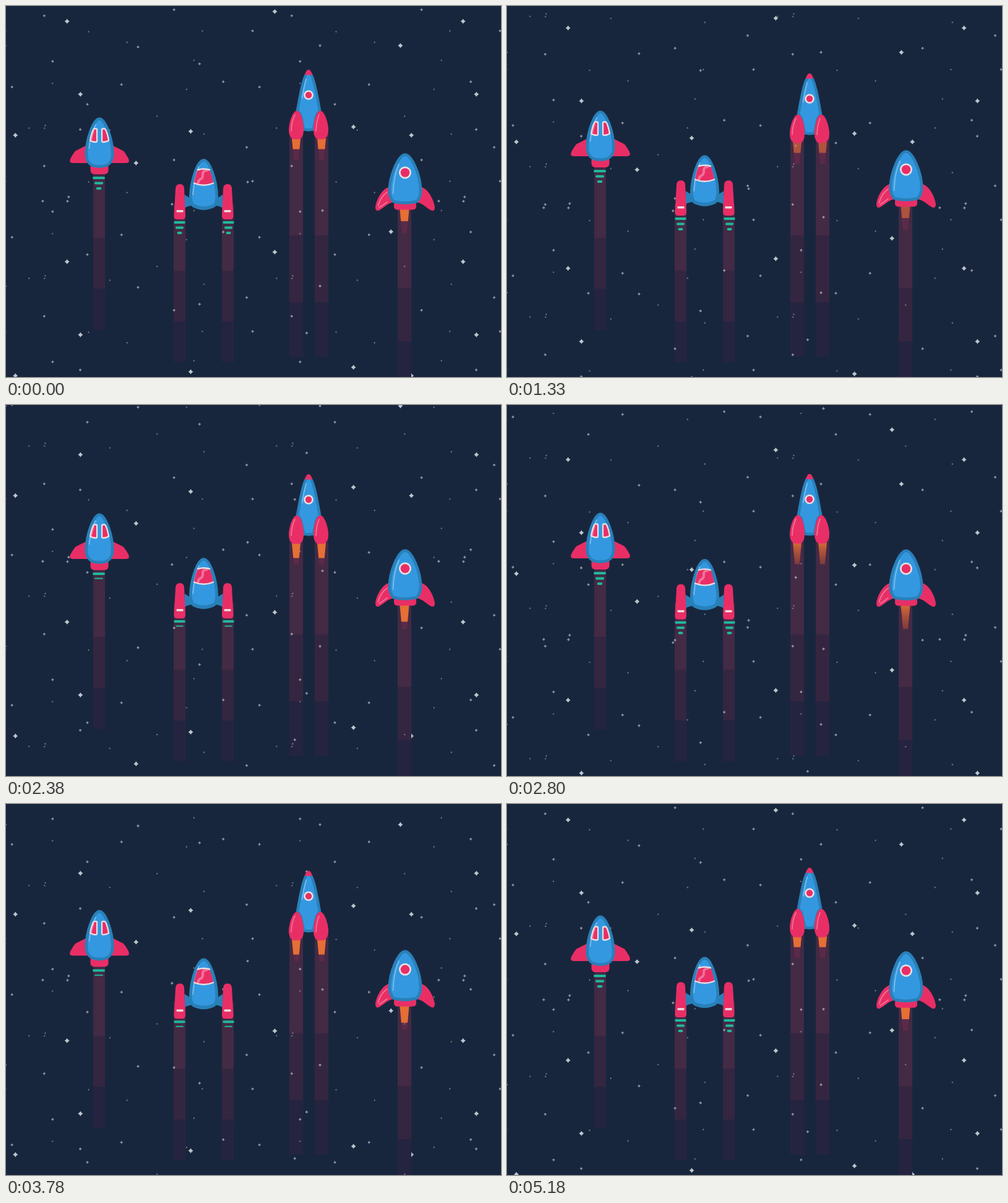
Write an HTML page with a canvas that moves like this. It is 800 px wide and 600 px high and loops after 5.25 s.

```html
<!DOCTYPE html>
<html lang="en">
<head>
<meta charset="utf-8">
<title>Rockets</title>
<style>
  html, body { margin: 0; width: 100%; height: 100%; overflow: hidden; background: #18263d; }
  canvas { display: block; }
</style>
</head>
<body>
<canvas id="stage" width="800" height="600"></canvas>
<script>
const ctx = document.getElementById('stage').getContext('2d');
const STEP = 70, STEPS = 75;
const NIGHT = '#18263d', BLUE = '#3498e0', DARK = '#2980b9', PINK = '#e92e66',
      PALE = '#e6dfe2', GREEN = '#1fb89c', ORANGE = '#e56f35', SHINE = 'rgba(255,255,255,.33)';
const TRAIL = ['#432a45', '#342641', '#252440'];

// Star tile, 400 x 243; the first nine are the large ones.
const TILE_W = 400, TILE_H = 243;
const STARS = [
  [61.5, 15.1], [75, 88.9], [9.3, 130.3], [131.2, 158.4], [186.4, 126.3], [271.3, 5.3],
  [350.8, 121.8], [388.7, 227.8], [398.2, 39.7],
  [133.2, 41], [195.3, 58.1], [74.8, 124.5], [63.1, 192.6], [61.9, 197], [36.9, 196.8], [243.9, 177.6],
  [167.5, 200], [319.5, 206.4], [317, 39.7], [303.5, 87.2], [291.5, 134.2]
];

// Heights of the four noses at a few steps; the drift between them is smooth.
const KEYS = [0, 10, 19, 34, 47, 61, 74];
const DRIFT = [
  [180, 174, 169, 175, 172, 172, 180],
  [247, 242, 241, 247, 250, 248, 247],
  [103, 106, 109, 112, 110, 106, 103],
  [238, 236, 233, 233, 234, 238, 238]
];

function drift(ys, k) {
  const n = KEYS.length - 1;
  const at = i => {
    const lap = Math.floor(i / n), j = i - lap * n;
    return [KEYS[j] + lap * KEYS[n], ys[j]];
  };
  const slope = i => {
    const [x0, y0] = at(i - 1), [x1, y1] = at(i + 1);
    return (y1 - y0) / (x1 - x0);
  };
  let i = 0;
  while (i < n - 1 && k >= KEYS[i + 1]) i++;
  const [x0, y0] = at(i), [x1, y1] = at(i + 1), h = x1 - x0, u = (k - x0) / h, v = 1 - u;
  return y0 * v * v * (1 + 2 * u) + y1 * u * u * (3 - 2 * u) +
         h * u * v * (v * slope(i) - u * slope(i + 1));
}

function fill(d, color) {
  ctx.fillStyle = color;
  ctx.fill(new Path2D(d));
}

function line(d, color, width) {
  ctx.strokeStyle = color;
  ctx.lineWidth = width;
  ctx.lineCap = ctx.lineJoin = 'round';
  ctx.stroke(new Path2D(d));
}

function outlined(d, color, edge, width) {
  fill(d, color);
  line(d, edge, width);
}

function pill(x, y, w, h, r, color) {
  ctx.fillStyle = color;
  ctx.beginPath();
  ctx.roundRect(x, y, w, h, r);
  ctx.fill();
}

function disc(y, r, color) {
  ctx.fillStyle = color;
  ctx.beginPath();
  ctx.arc(0, y, r, 0, 7);
  ctx.fill();
}

function at(x, y, draw) {
  ctx.save();
  ctx.translate(x, y);
  draw();
  ctx.restore();
}

function bothSides(draw) {
  draw();
  ctx.save();
  ctx.scale(-1, 1);
  draw();
  ctx.restore();
}

function starLayer(scale, speed, k, largeAlpha, smallAlpha) {
  const w = TILE_W * scale, h = TILE_H * scale, shift = (k * speed) % h + .6;
  ctx.fillStyle = '#e8edf2';
  for (let left = .3 - w; left < 800; left += w)
    for (let top = shift - h; top < 600 + h; top += h)
      STARS.forEach(([sx, sy], i) => {
        const x = left + sx * scale, y = top + sy * scale;
        const r = (i < 9 ? 2.5 : 1.6) * scale, c = r * .33;
        ctx.globalAlpha = i < 9 ? largeAlpha : smallAlpha;
        ctx.beginPath();
        ctx.moveTo(x, y - r);
        ctx.quadraticCurveTo(x + c, y - c, x + r, y);
        ctx.quadraticCurveTo(x + c, y + c, x, y + r);
        ctx.quadraticCurveTo(x - c, y + c, x - r, y);
        ctx.quadraticCurveTo(x - c, y - c, x, y - r);
        ctx.fill();
      });
  ctx.globalAlpha = 1;
}

function trail(x, w, ...ys) {
  TRAIL.forEach((color, i) => {
    ctx.fillStyle = color;
    ctx.fillRect(x, ys[i], w, ys[i + 1] - ys[i]);
  });
}

// Exhaust bars; part of the time only the upper ones show.
function bars(x, y, w, phase) {
  ctx.save();
  if (phase > .16 && phase < .6) {
    ctx.beginPath();
    ctx.rect(x - 20, y - 2, 40, 12.5);
    ctx.clip();
  }
  [w, w * .71, w * .43].forEach((bw, i) => pill(x - bw / 2, y + i * 8.5, bw, 4, 2, GREEN));
  ctx.restore();
}

function flame(x, y, w, h, phase) {
  const cone = len => {
    const a = w / 2, b = a - w * .23 * len;
    return `M${x - a},${y}H${x + a}L${x + b},${y + h * len}H${x - b}Z`;
  };
  fill(cone(1), 'rgba(233,46,102,.15)');
  if (phase < .16) {
    ctx.globalAlpha = 1 - phase * 3;
    fill(cone(.5), ORANGE);
  } else if (phase < .6) {
    fill(cone(.7), ORANGE);
  } else {
    const fade = ctx.createLinearGradient(0, y, 0, y + h);
    fade.addColorStop(0, 'rgba(229,111,53,.9)');
    fade.addColorStop(1, 'rgba(190,90,45,.35)');
    fill(cone(1), fade);
  }
  ctx.globalAlpha = 1;
}

function shuttle(phase) {
  bars(-1, 96, 20, phase);
  bothSides(() => fill('M-20,45 L-38,54 Q-41,56 -47,67 Q-50,74 -43,74 H-16Z', PINK));
  pill(-14.5, 74, 29, 18, 6, PINK);
  outlined('M0,2.5C9.5,2.5 21.2,36 21.2,59C21.2,74 14,79.5 0,79.5C-14,79.5 -21.2,74 -21.2,59C-21.2,36 -9.5,2.5 0,2.5Z',
    BLUE, DARK, 4.7);
  line('M-6,12Q-14,25 -16.5,50', SHINE, 2);
  bothSides(() => outlined('M-8,18.5H-5.5Q-4,18.5 -4,20V38Q-4,40 -6,40Q-11,40 -15,37.5Q-13,26 -10,20Q-9.2,18.5 -8,18.5Z', PINK, PALE, 2.3));
  line('M-9,22Q-12,29 -12.5,36', SHINE, 2);
}

function fighter(phase) {
  bars(-39, 101, 18.5, phase);
  bars(40, 101, 18.5, phase);
  bothSides(() => {
    fill('M-31,58L-20,65L-12,76Q-24,75 -31,80Z', DARK);
    fill('M-45.5,48Q-45,41 -38.5,41Q-32,41 -31.5,48L-29.5,92Q-29.5,98 -35,98H-43Q-48,98 -48,92Z', PINK);
    pill(-44, 83, 11, 3.5, 1, PALE);
  });
  outlined('M0,2.5C10,2.5 20.5,36 21.2,60Q21.2,70 17,76Q9,80.5 0,80.5Q-9,80.5 -17,76Q-21.2,70 -21.2,60C-20.5,36 -10,2.5 0,2.5Z',
    BLUE, DARK, 4.7);
  fill('M-18,72Q0,82 18,72L16,79Q0,86 -16,79Z', DARK);
  line('M-8,13Q-15,30 -17.5,58', SHINE, 2);
  fill('M-9.5,18Q0,15 9.5,18Q13,25 15.5,39.5Q0,46 -15.5,39.5Q-13,25 -9.5,18Z', PINK);
  line('M5,19C-7,20 3,30 -5,33Q-9,35 -9,39', SHINE, 4);
  line('M-9.5,18Q0,15 9.5,18M-15.5,39.5Q0,46 15.5,39.5', PALE, 2.4);
}

function booster(phase) {
  flame(-20, 111, 14, 35, phase);
  flame(21, 111, 14, 35, phase);
  outlined('M0,4C7,4 13.5,40 18,66L11,95Q0,100 -11,95L-18,66C-13.5,40 -7,4 0,4Z', BLUE, DARK, 4.5);
  bothSides(() => fill('M-20,64Q-11,66 -9,80L-5,99H-14Z', DARK));
  fill('M0,0Q4,0 6,8.5H-6Q-4,0 0,0Z', PINK);
  line('M-4,15Q-8,30 -10.5,46', SHINE, 2);
  disc(41, 7.8, PALE);
  disc(41, 5.2, PINK);
  bothSides(() => fill('M-19,66.5C-26,67 -32,86 -32,98Q-32,108 -25,112.5H-14Q-8,108 -8,98C-8,84 -12,66.5 -19,66.5Z', PINK));
  line('M-22,73Q-27.5,83 -28,99', SHINE, 1.8);
  line('M17,73Q12.5,83 12,99', SHINE, 1.8);
}

function rocket(phase) {
  flame(-1, 91, 15, 38, phase);
  bothSides(() => fill('M-24,54C-37,57 -46,74 -48,87Q-48,95 -42,92.5C-34,88.5 -29,81 -18,79Z', PINK));
  line('M-29,63Q-40,71 -43.5,85M-42,88Q-35,84 -29,79', SHINE, 1.8);
  pill(-18, 78, 36, 13.5, 5, PINK);
  outlined('M0,2.5C10.5,2.5 24.5,35 25.2,60Q25.2,71 19,78Q10,80.5 0,80.5Q-10,80.5 -19,78Q-25.2,71 -25.2,60C-24.5,35 -10.5,2.5 0,2.5Z',
    BLUE, DARK, 4.7);
  line('M-10,18Q-18.5,36 -19.5,65', SHINE, 2);
  disc(31.5, 10, PALE);
  disc(31.5, 7.3, PINK);
}

function draw(k) {
  const phase = (k * STEP / 259) % 1;
  const [y1, y2, y3, y4] = DRIFT.map(ys => drift(ys, k));
  ctx.fillStyle = NIGHT;
  ctx.fillRect(0, 0, 800, 600);

  trail(141, 19, 245, 375, 457, 524);
  trail(271, 19, 320, 428, 510, 576);
  trail(349, 19, 320, 428, 510, 576);
  trail(458, 22, 205, 371, 479, 567);
  trail(499, 22, 205, 371, 479, 567);
  starLayer(1.6, 21.03, k, .8, .55);
  // This trail hides the near stars, the far ones shine over it.
  trail(633, 22, 310, 456, 542, 600);
  starLayer(1, 3.285, k, .55, .42);

  at(151, y1, () => shuttle(phase));
  at(319.5, y2, () => fighter(phase));
  at(489, y3, () => booster(phase));
  at(645, y4, () => rocket(phase));
}

function tick() {
  draw(Math.floor(performance.now() / STEP) % STEPS);
  requestAnimationFrame(tick);
}
tick();
</script>
</body>
</html>
```
